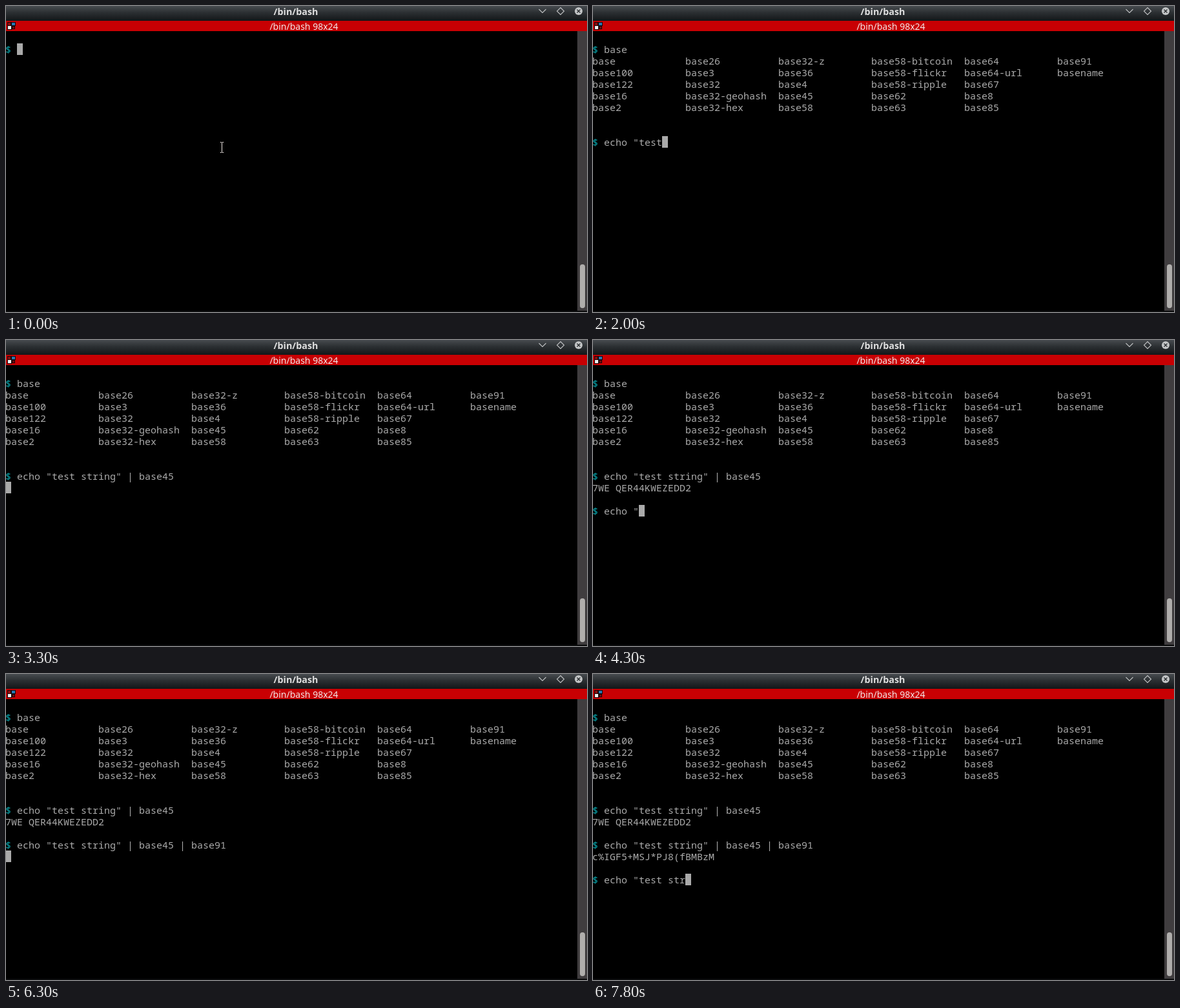
Write an HTML page that moves like this. It is 900 px wide and 475 px high and loops after 8 s.

```html
<!DOCTYPE html>
<html lang="en">
<head>
<meta charset="utf-8">
<title>/bin/bash</title>
<style>
  html, body { margin: 0; width: 100%; height: 100%; overflow: hidden; background: #000; }
  #stage { position: absolute; left: 0; top: 0; width: 900px; height: 475px; overflow: hidden; background: #000; }
  #stage > * { position: absolute; }
  .bar { left: 0; width: 100%; text-align: center; white-space: pre; }
  #window-title {
    top: 0; height: 23px; text-indent: -2px;
    font: bold 14.3px/17px "Noto Sans", "Open Sans", sans-serif; color: #dfdfdf;
    background: linear-gradient(#474b4f, #2b2f32 45%, #131618);
  }
  #pane-title {
    top: 23px; height: 16px; text-indent: 23px;
    font: 14px/18px "Noto Sans", "Open Sans", sans-serif; color: #f4e8e8;
    background: #c80003;
  }
  #screen {
    left: -1px; top: 40px; color: #aaa; white-space: pre;
    font: 15px/18px "Noto Sans Mono", "DejaVu Sans Mono", monospace; font-variant-ligatures: none;
  }
  #screen div { height: 18px; }
  #screen b { color: #06868c; }
  #cursor { width: 9px; height: 18px; background: #aaa; }
  #track { left: 885px; top: 39px; width: 15px; height: 434px; background: #403d3f; }
  #thumb { left: 889px; top: 401px; width: 8px; height: 68px; border-radius: 4px; background: #b0aeac; }
  #floor { left: 0; top: 473px; width: 900px; height: 2px; background: #0b0c0d; }
</style>
</head>
<body>
<div id="stage">
  <div id="window-title" class="bar">/bin/bash</div>
  <div id="pane-title" class="bar">/bin/bash 98x24</div>
  <div id="screen"></div>
  <div id="cursor"></div>
  <div id="track"></div>
  <div id="thumb"></div>
  <div id="floor"></div>
  <svg width="900" height="475" style="left:0;top:0" fill="none">
    <path d="M825.5 5 831 10.5 836.5 5M859 2.5 864.5 8 859 13.5 853.5 8Z" stroke="#bfc1c2" stroke-width="1.1"/>
    <circle cx="887" cy="8" r="6" fill="#c4c6c7"/>
    <path d="M884.5 5.5l5 5m0-5l-5 5" stroke="#25282b" stroke-width="1.3"/>
    <path d="M2 25h13v6h-1v5h-5v1h-7z" fill="#160608"/>
    <path d="M3 26h4v4h-4z" fill="#8d1010"/>
    <path d="M9 26h5v4h-5z" fill="#2679b5"/>
    <path d="M3 31h5v5h-5z" fill="#f2f2f2"/>
    <path d="M10 32h3v3h-3z" fill="#6d0a0c"/>
    <path id="pointer" d="M332 211.5h2m1 0h2M334.5 212v15M332 227.5h2m1 0h2" stroke="#f1e9e6"/>
  </svg>
</div>
<script>
const LOOP = 8000, CELL = 9, LINE = 18, TOP = 40;

const table = (...lines) => lines.map(line =>
  line.split(' ').map(name => name.padEnd(16)).join(''));

const rows = [
  '',
  '$ base',
  ...table(
    'base base26 base32-z base58-bitcoin base64 base91',
    'base100 base3 base36 base58-flickr base64-url basename',
    'base122 base32 base4 base58-ripple base67',
    'base16 base32-geohash base45 base62 base8',
    'base2 base32-hex base58 base63 base85'),
  '', '',
  '$ echo "test string" | base45',
  '7WE QER44KWEZEDD2',
  '',
  '$ echo "test string" | base45 | base91',
  'c%IGF5+MSJ*PJ8(fBMBzM',
  '',
  '$ echo "test string" | base45 | base91'
];

// Cursor columns reached at 100 ms intervals.
const typing = (start, row, cols) => cols.map((col, i) => [start + i * 100, row, col]);

// [time, cursor row, cursor column, cursor hidden]
const steps = [
  [0, 1, 2], [400, 1, 6], [800, 7, 0], [900, 9, 2], [1400, 9, 2, true],
  ...typing(1800, 9, [5, 9, 12, 16, 19, 22, 26, 29]),
  [3300, 10, 0], [3400, 12, 2], [3800, 12, 2, true],
  ...typing(4100, 12, [3, 5, 8, 12, 15, 18, 22, 25, 28, 32]),
  ...typing(5200, 12, [35, 38]),
  [6300, 13, 0], [6400, 15, 2], [6900, 15, 2, true], [7300, 15, 6],
  ...typing(7600, 15, [9, 13, 16])
];

const find = id => document.getElementById(id);
const screen = find('screen'), cursor = find('cursor'), pointer = find('pointer');

const lines = rows.map(text => {
  const line = screen.appendChild(document.createElement('div'));
  const prompt = line.appendChild(document.createElement('b'));
  const body = line.appendChild(document.createElement('span'));
  const split = text.startsWith('$') ? 1 : 0;
  return length => {
    prompt.textContent = text.slice(0, Math.min(split, length));
    body.textContent = text.slice(split, Math.max(split, length));
  };
});

let shown;
function show(step) {
  if (step === shown) return;
  shown = step;
  const [time, row, col, hidden] = step;
  lines.forEach((reveal, i) => reveal(i < row ? rows[i].length : i === row ? col : 0));
  cursor.style.left = col * CELL - 1 + 'px';
  cursor.style.top = TOP + row * LINE + 'px';
  cursor.style.visibility = hidden ? 'hidden' : 'visible';
  pointer.style.visibility = time < 400 ? 'visible' : 'hidden';
}

const start = performance.now();
function tick() {
  const time = (performance.now() - start) % LOOP;
  show(steps.findLast(step => step[0] <= time));
  requestAnimationFrame(tick);
}
tick();
</script>
</body>
</html>
```
